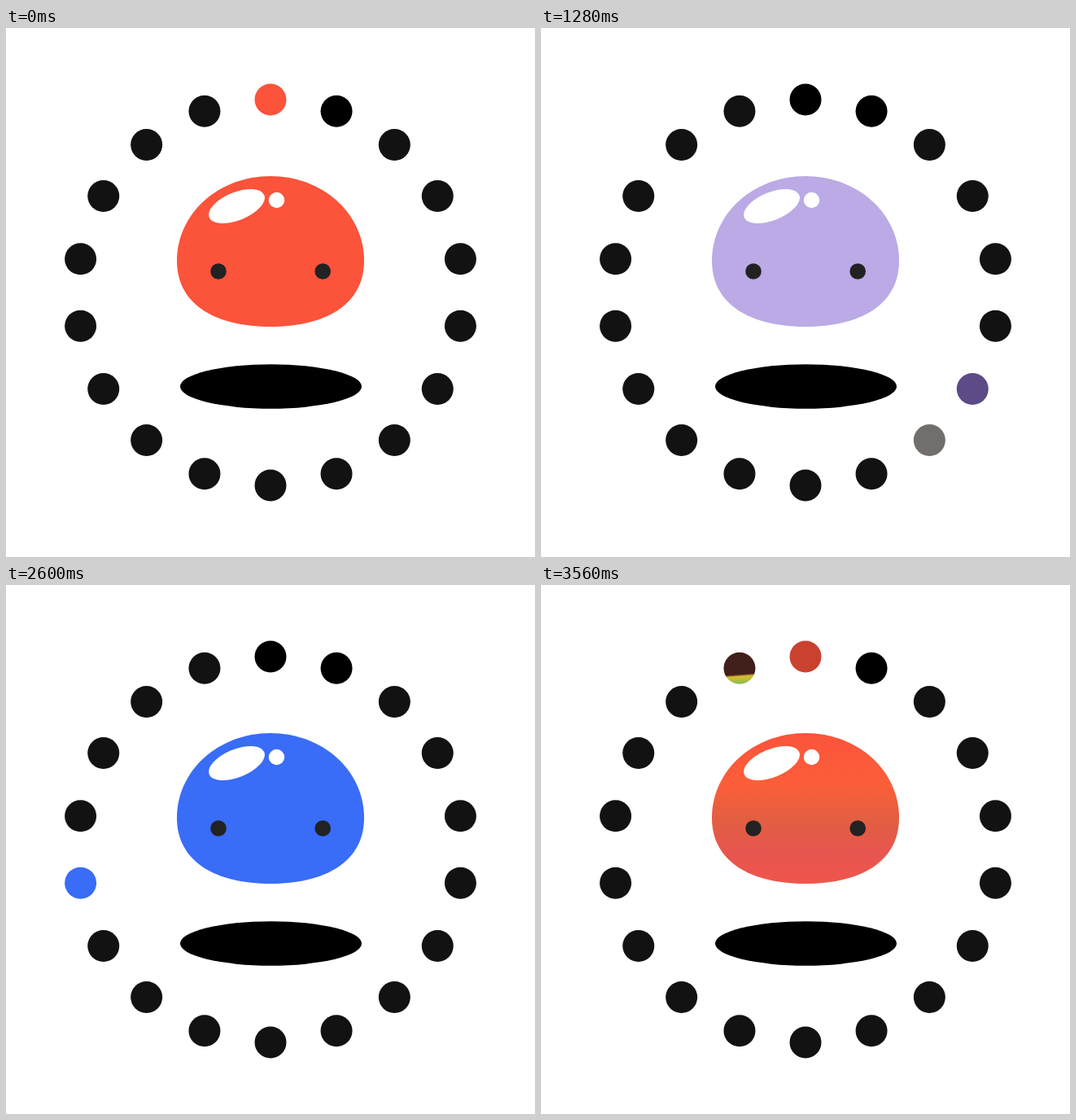
An HTML page with a canvas that plays this animation: 650 px wide and 650 px high, repeating every 3600 ms.

```html
<!DOCTYPE html>
<html lang="en">
<head>
<meta charset="utf-8">
<title>Colour ring</title>
<style>
  html, body { margin: 0; width: 100%; height: 100%; overflow: hidden; background: #fff; }
  canvas { display: block; }
</style>
</head>
<body>
<canvas id="stage" width="650" height="650"></canvas>
<script>
const ctx = document.getElementById('stage').getContext('2d');
const LOOP = 3600, STEP = 200, TICK = 40, DOTS = 18;

const red = [252, 83, 59], orange = [255, 138, 50], yellow = [255, 191, 41];
const green = [8, 198, 130], blue = [57, 108, 247], indigo = [59, 86, 154];
const violet = [141, 113, 211], white = [255, 255, 255], cream = [255, 249, 243];
const palette = [red, orange, yellow, green, blue, indigo, violet, white, white];
const RAINBOW = palette.length - 1;

const body = new Path2D(
  'M325 182C389 182 440 228 440 286C440 341 391 367 325 367' +
  'C259 367 210 341 210 286C210 228 261 182 325 182Z');

const rgb = c => `rgb(${c.map(Math.round).join()})`;
const mix = (a, b, p) => a.map((v, i) => v + (b[i] - v) * p);
const clamp = v => Math.max(0, Math.min(1, v));
const fade = p => p ** 1.4;
const isRainbow = i => i % palette.length === RAINBOW;

// The last rainbow sits on red, so the loop closes on the first colour.
const solid = i => i >= DOTS - 1 ? red : palette[i % palette.length];

function ellipse(x, y, rx, ry, fill, angle = 0) {
  ctx.fillStyle = fill;
  ctx.beginPath();
  ctx.ellipse(x, y, rx, ry, angle, 0, 2 * Math.PI);
  ctx.fill();
}

const circle = (x, y, r, fill) => ellipse(x, y, r, r, fill);

function gradient(x0, y0, x1, y1, stops) {
  const g = ctx.createLinearGradient(x0, y0, x1, y1);
  for (const [at, color] of stops) g.addColorStop(clamp(at), rgb(color));
  return g;
}

const bodyRainbow = gradient(325, 182, 325, 367, [
  [0, red], [0.34, [253, 189, 41]], [0.58, [0, 193, 120]],
  [0.79, [48, 105, 246]], [1, [133, 112, 224]]
]);

// The bands slide up from the bottom of the dot as it lights.
function dotRainbow(x, y, r, rest, p) {
  const top = 0.87 - 0.56 * p;
  return gradient(x - 1.5, y - r, x + 4.5, y + 3 * r, [
    [(0.88 - 0.95 * p) / 2, mix(rest, red, p)],
    [top / 2, [222, 186, 46]],
    [(top + 0.11 / p) / 2, green],
    [(top + 0.25 / p) / 2, blue]
  ]);
}

function drawDot(i, p) {
  const angle = i / DOTS * 2 * Math.PI, r = 19.5;
  const x = 325 + 237 * Math.sin(angle), y = 325 - 237 * Math.cos(angle);
  const rest = i < 2 ? [0, 0, 0] : [18, 18, 18];
  const color = palette[i % palette.length];
  const lit = color === white ? cream : color;
  circle(x, y, r, p > 0 && isRainbow(i) ? dotRainbow(x, y, r, rest, p) : rgb(mix(rest, lit, p)));
}

function drawBody(step, p) {
  const next = (step + 1) % DOTS;
  ctx.fillStyle = rgb(mix(solid(step), solid(next), p));
  ctx.fill(body);
  ctx.globalAlpha = isRainbow(step) ? fade(1 - p) : isRainbow(next) ? fade(p) : 0;
  ctx.fillStyle = bodyRainbow;
  ctx.fill(body);
  ctx.globalAlpha = 1;
  ellipse(283.5, 219, 36.5, 17.2, '#fff', -22 * Math.PI / 180);
  circle(332.5, 211.5, 9.7, '#fff');
  circle(261, 299, 9.8, '#222');
  circle(389.2, 299, 9.8, '#222');
}

function draw(now) {
  const t = Math.floor(now % LOOP / TICK) * TICK;
  const step = Math.floor(t / STEP), p = t % STEP / STEP;
  ctx.fillStyle = '#fff';
  ctx.fillRect(0, 0, 650, 650);
  for (let i = 0; i < DOTS; i++) {
    drawDot(i, i === step ? 1 - p : i === (step + 1) % DOTS ? p : 0);
  }
  ellipse(325.5, 440.5, 111.5, 27.2, '#000');
  drawBody(step, p);
}

let start;
function tick(now) {
  start ??= now;
  draw(now - start);
  requestAnimationFrame(tick);
}
draw(0);
requestAnimationFrame(tick);
</script>
</body>
</html>
```
